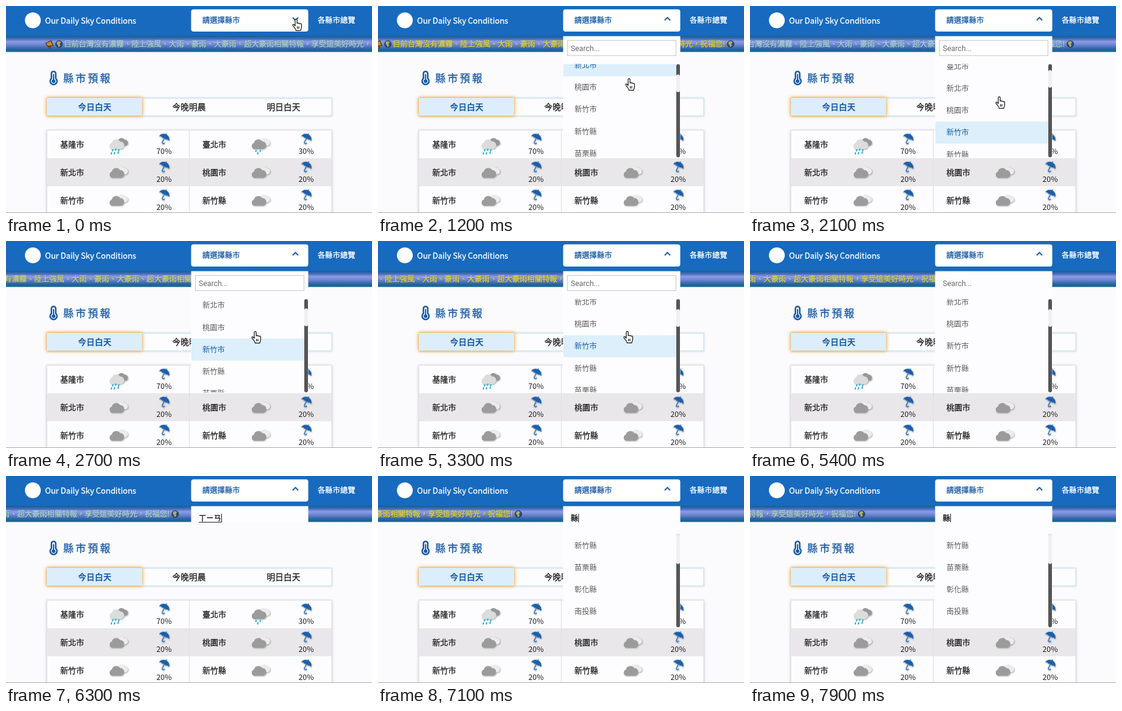
Animation of 600 by 340 pixels, one loop 8000 ms. Source, as an HTML page:

```html
<!DOCTYPE html>
<html lang="zh-Hant">
<head>
<meta charset="utf-8">
<title>縣市預報</title>
<style>
html, body { margin: 0; width: 100%; height: 100%; overflow: hidden; background: #fbfbfe; }
svg { display: block; }
text { font-family: "Noto Sans CJK TC", "Noto Sans CJK", "Noto Sans CJK JP", sans-serif; white-space: pre; }
.roboto { font-family: Roboto, "Noto Sans CJK TC", "Noto Sans CJK JP", sans-serif; }
.soft { filter: drop-shadow(1px 1px 1px #0005); }
.glow { filter: drop-shadow(0 0 2px #f5a83acc) drop-shadow(0 0 3px #f5a83acc); }
.frame { filter: drop-shadow(0 0 1.5px #c9dce3); }
.box { filter: drop-shadow(0 1px 2px #0003); }
</style>
</head>
<body>
<svg id="stage" width="600" height="340" viewBox="0 0 600 340">
  <defs>
    <linearGradient id="bar" x2="0" y2="1">
      <stop offset="0" stop-color="#0d6390"/><stop offset=".16" stop-color="#3f66b4"/>
      <stop offset=".36" stop-color="#8c9ce8"/><stop offset=".56" stop-color="#6c86d0"/>
      <stop offset=".82" stop-color="#2a62a4"/><stop offset="1" stop-color="#0b6a88"/>
    </linearGradient>
    <path id="cloud" d="M5 17A5.2 5.2 0 0 1 4.5 7A7.5 7.5 0 0 1 18 4.5A6.3 6.3 0 0 1 19.5 17Z"/>
    <g id="umbrella" class="soft" transform="rotate(26)">
      <path d="M-9 0A9 8 0 0 1 9 0Q6-2.6 3 0Q0-2.6-3 0Q-6-2.6-9 0Z" fill="#1b5fab"/>
      <path d="M0-9V6a1.9 1.9 0 0 0 3.8 0" fill="none" stroke="#1b5fab" stroke-width="1.4" stroke-linecap="round"/>
    </g>
    <g id="globe">
      <circle r="5.6" fill="#24507f" stroke="#16324f" stroke-width=".8"/>
      <path d="M-3-4Q1-6 3-3L1 0 2 3-1 5-2 1-4 0Z" fill="#b9a95a"/>
    </g>
    <clipPath id="listClip"><rect x="304" y="95.5" width="191" height="153"/></clipPath>
  </defs>
  <g id="page"></g>
  <rect y="49" width="600" height="26.5" fill="url(#bar)"/>
  <g id="ticker"></g>
  <g id="menu"></g>
  <path id="chevron" fill="none" stroke="#1b5fab" stroke-width="2"/>
  <path id="hand" fill="#fff" stroke="#111" stroke-width="1.2" stroke-linejoin="round"
    d="M5 12V2.5a1.6 1.6 0 0 1 3.2 0V8a1.5 1.5 0 0 1 2.6.4 1.4 1.4 0 0 1 2.4.6 1.3 1.3 0 0 1 2.3.8v4c0 3-1.2 3.5-1.5 6H6.5C6 16.5 3 14 1.2 11.5 .5 10 2 9 3.2 10ZM8.6 13v4M11 13v4"/>
  <path id="beam" fill="none" stroke="#111" stroke-width="1.3" d="M-3.5-7.5Q0-7.5 0-5Q0-7.5 3.5-7.5M0-6V6M-3.5 7.5Q0 7.5 0 5Q0 7.5 3.5 7.5M-1.8 2H1.8"/>
</svg>
<script>
const LOOP = 8000, STEP = 100, BLUE = '#1b5ca6', SIZE = 12.3, PITCH = 36.2;
const $ = id => document.getElementById(id);

// x is the left edge, cy the optical middle of the line
const text = (x, cy, str, fill, size = SIZE, extra = '') =>
  `<text x="${x}" y="${cy + size * .37}" font-size="${size}" fill="${fill}" ${extra}>${str}</text>`;
const rect = (x, y, w, h, fill, extra = '') =>
  `<rect x="${x}" y="${y}" width="${w}" height="${h}" fill="${fill}" ${extra}/>`;
const use = (id, x, y, extra = '', scale = 1) =>
  `<use href="#${id}" transform="translate(${x} ${y}) scale(${scale})" ${extra}/>`;
const mid = 'text-anchor="middle"';
// a hairline in the text colour gives a medium weight
const medium = color => `stroke="${color}" stroke-width=".3"`;

function weather(x, y, kind) {
  const [front, back] = kind == 'rain' ? ['#dcdcdc', '#979797'] : ['#9b9b9b', '#ececec'];
  const top = kind == 'dry' ? y - 1 : y - 2;
  const drops = { rain: [[6, 20], [11, 19], [16, 20], [4, 25], [9, 25], [15, 24]], drizzle: [[8, 21], [15, 21], [11, 25]], dry: [] };
  return `<g class="soft">${use('cloud', x + 11, top - 9, `fill="${back}"`, .8)}${use('cloud', x, top - 7, `fill="${front}"`, 1)}</g>` +
    drops[kind].map(([dx, dy]) => `<path d="M${x + dx} ${top + dy - 9}l-.4 2" stroke="#35b5d8" stroke-width="2.2" stroke-linecap="round"/>`).join('');
}

function cell(x, row, city, kind, pct) {
  const y = 227 + row * 46;
  return text(x + 22, y + .5, city, '#222', 13, medium('#222')) + weather(x + 102, y, kind) +
    use('umbrella', x + 192, y - 9) + text(x + 192, y + 11.2, pct + '%', '#222', SIZE, mid);
}

$('page').innerHTML =
  rect(0, 0, 600, 340, '#fbfbfe') + rect(0, 0, 600, 50, '#176abe') +
  '<circle cx="44" cy="23.5" r="13" fill="#fff"/>' +
  text(64, 23.7, 'Our Daily Sky Conditions', '#fff', 13, medium('#fff')) +
  text(511, 23.7, '各縣市總覽', '#fff', SIZE, medium('#fff')) +
  rect(303.5, 5.5, 192, 36.5, '#fff', 'rx="4"') +
  text(322, 23.7, '請選擇縣市', BLUE, SIZE, medium(BLUE)) +
  `<path d="M74.5 119V111a3.5 3.5 0 0 1 7 0v8a5.6 5.6 0 1 1-7 0Z" fill="#fff" stroke="${BLUE}" stroke-width="2.6"/>
   <path d="M78 112v10" stroke="${BLUE}" stroke-width="2"/><circle cx="78" cy="123.4" r="3" fill="${BLUE}"/>` +
  text(94, 118.7, '縣市預報', BLUE, 17, 'letter-spacing="3" ' + medium(BLUE)) +
  rect(68, 151.5, 466, 29, '#fdfdff', 'stroke="#d9e8ee" stroke-width="2" class="frame"') +
  rect(67, 151, 156, 29, '#dceefb', 'class="glow"') +
  text(145.5, 166.2, '今日白天', BLUE, 13.7, mid + ' font-weight="700"') +
  text(300, 166.2, '今晚明晨', '#222', 13.7, mid + ' ' + medium('#222')) +
  text(455, 166.2, '明日白天', '#222', 13.7, mid + ' ' + medium('#222')) +
  rect(67, 204, 467, 150, '#fdfdff', 'stroke="#dcdce2" class="box"') +
  rect(67, 250, 467, 46, '#e9e7ea') +
  rect(300, 204, 1, 136, '#dedee3') +
  cell(67, 0, '基隆市', 'rain', 70) + cell(300, 0, '臺北市', 'drizzle', 30) +
  cell(67, 1, '新北市', 'dry', 20) + cell(300, 1, '桃園市', 'dry', 20) +
  cell(67, 2, '新竹市', 'dry', 20) + cell(300, 2, '新竹縣', 'dry', 20) +
  rect(0, 339, 600, 1, '#a9a9ad');

const news = '目前台灣沒有濃霧、陸上強風、大雨、豪雨、大豪雨、超大豪雨相關特報，享受這美好時光，祝福您!';
$('ticker').innerHTML =
  '<path d="M-30 61l9-4 3 8-9 1zM-26 66l2 3h2l-1-4" fill="#c98a22" stroke="#4a3012" stroke-width="1.2"/>' +
  use('globe', -8, 62.5) + use('globe', 554, 62.5) +
  text(.6, 63, news, '#3a4a72', SIZE, 'opacity=".6"') +
  text(0, 62.3, news, 'inherit', SIZE, 'id="news" stroke-width=".3"');

const cities = '基隆市 臺北市 新北市 桃園市 新竹市 新竹縣 苗栗縣 臺中市 彰化縣 南投縣 雲林縣 嘉義市 嘉義縣 臺南市 高雄市 屏東縣 宜蘭縣 花蓮縣 臺東縣 澎湖縣 金門縣 連江縣'.split(' ');

// rows of [time, value]
const OPEN = 400, FOCUS = 4800;
const pointer = [[0, 477, 31], [500, 477, 31], [900, 418, 122], [1200, 413, 129], [1600, 410, 159], [3300, 410, 158], [3700, 410, 158], [4200, 428, 65]];
const scroll = [[800, 0], [1200, 89], [1500, 122], [1700, 99], [1900, 70], [2100, 51], [2400, 51], [2800, 86]];
const hover = [[0, -1], [800, 0], [1000, 1], [1100, 2], [1400, 4], [3800, 3], [3900, 2], [4000, -1]];
const typed = [[0, ''], [5500, 'ㄒ'], [5800, 'ㄒㄧ'], [6100, 'ㄒㄧㄢ'], [6600, '縣']];
const COMMIT = 6900;

const held = (keys, t) => keys.filter(k => k[0] <= t).pop()[1];
function tween(keys, t, i = 1) {
  const n = keys.findIndex(k => k[0] > t);
  if (n < 0) return keys[keys.length - 1][i];
  if (n == 0) return keys[0][i];
  const a = keys[n - 1], b = keys[n], u = (t - a[0]) / (b[0] - a[0]);
  return a[i] + (b[i] - a[i]) * u * u * (3 - 2 * u);
}

function menu(t) {
  if (t < OPEN) return '';
  const query = held(typed, t), focused = t >= FOCUS, done = t >= COMMIT;
  const items = query ? (done ? cities.filter(c => c.includes(query)) : []) : cities;
  let out = rect(303.5, 49.5, 192, items.length ? 200 : 26.5, '#fdfdff');
  if (!focused) out += rect(310.5, 56.5, 178, 25, '#fff', 'stroke="#c9c9c9"');
  if (query) {
    const w = query.length * SIZE;
    out += text(316, 69, query, '#111', SIZE, 'class="roboto" ' + medium('#111')) + rect(316 + w, 62, 1, 14, '#111');
    if (!done) out += rect(316, 75.5, w, 1, '#111');
  } else {
    out += text(316, 69, 'Search...', '#6a6a6a', SIZE, 'class="roboto"');
    if (focused && (t - FOCUS) % 1000 < 500) out += rect(316, 62, 1, 14, '#111');
  }
  if (!items.length) return out;

  const top = query ? 0 : tween(scroll, t), hot = query ? -1 : held(hover, t);
  const ratio = 152 / (items.length * PITCH);
  out += '<g clip-path="url(#listClip)">' + items.map((c, i) => {
    const cy = 114 + i * PITCH - top;
    return (i == hot ? rect(304, cy - 18, 185, PITCH, '#dceffb', 'rx="2"') : '') +
      text(322, cy, c, i == hot ? BLUE : '#5a5a5a', SIZE, 'class="roboto"');
  }).join('') + '</g>';
  return out + rect(489, 95.5, 6, 153, '#555', 'rx="3"') +
    rect(489, 95.5 + top * ratio, 6, 152 * ratio, '#f0f0f2', 'rx="3"');
}

const mix = (a, b, k) => `rgb(${a.map((v, i) => Math.round(v + (b[i] - v) * k))})`;
const show = (id, on) => $(id).setAttribute('visibility', on ? 'visible' : 'hidden');
const move = (id, x, y) => $(id).setAttribute('transform', `translate(${x} ${y})`);

function draw(t) {
  const warm = .5 + .5 * Math.cos((t - 1150) / 1000 * Math.PI);
  const color = mix([164, 212, 212], [226, 212, 50], warm);
  move('ticker', 95 - t * .059, 0);
  $('news').setAttribute('fill', color);
  $('news').setAttribute('stroke', color);
  $('menu').innerHTML = menu(t);
  $('chevron').setAttribute('d', t < OPEN ? 'M470 19l4.5 4.5 4.5-4.5' : 'M470 23.5l4.5-4.5 4.5 4.5');
  const x = tween(pointer, t), y = tween(pointer, t, 2);
  const inField = t > 3700 && y < 82;
  show('hand', !inField);
  show('beam', inField && t < 5400);
  move('hand', x - 8, y - 10.5);
  move('beam', x, y);
}

let last = -1;
function tick(now) {
  const t = Math.floor(now % LOOP / STEP) * STEP;
  if (t != last) draw(last = t);
  requestAnimationFrame(tick);
}
draw(0);
requestAnimationFrame(tick);
</script>
</body>
</html>
```
